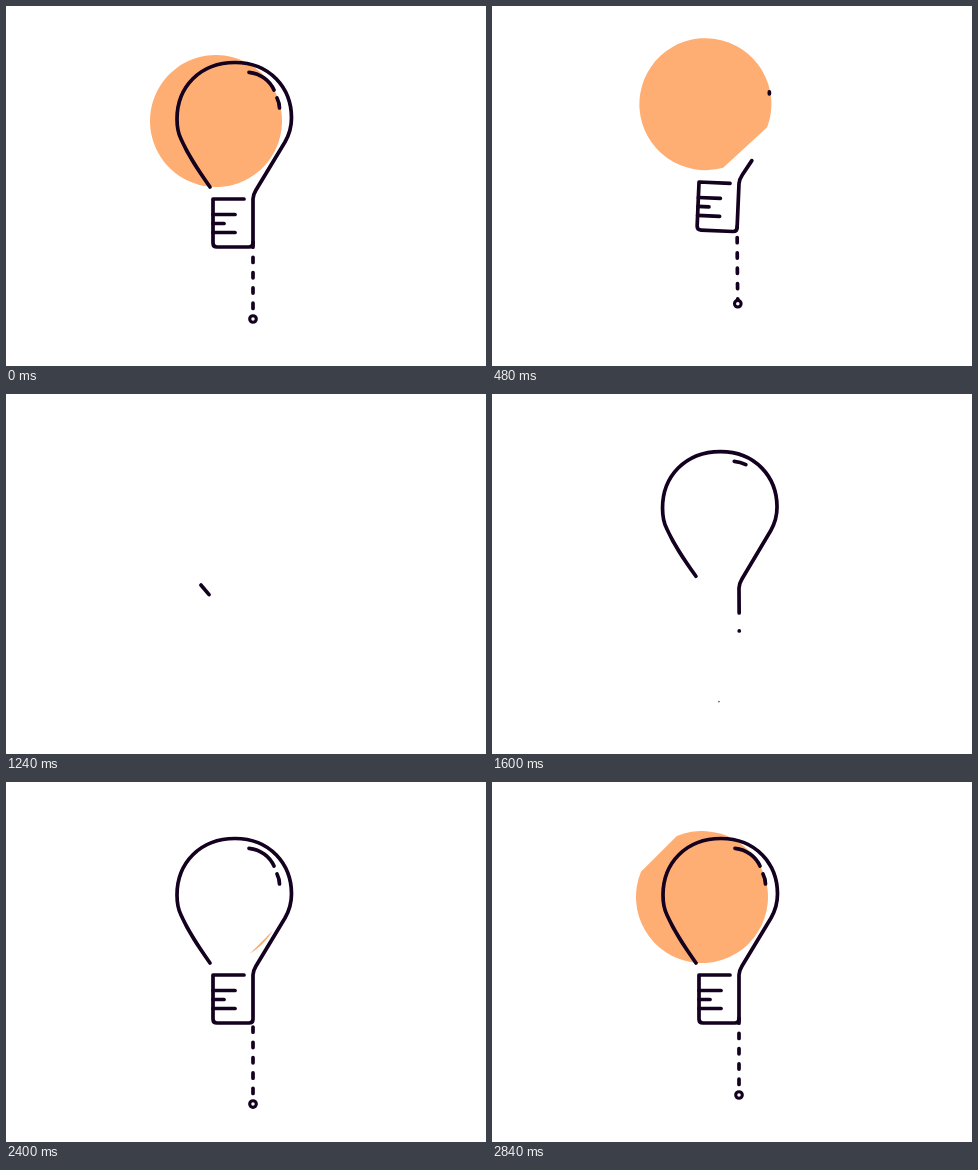
An HTML page that plays this animation: 480 by 360 pixels, repeating every 2880 ms.

```html
<!DOCTYPE html>
<html lang="en">
<head>
<meta charset="utf-8">
<title>Light bulb</title>
<style>
  html, body { margin: 0; width: 100%; height: 100%; overflow: hidden; background: #fff; }
  svg { display: block; width: 100%; height: 100%; }
  path, circle { stroke: #14001f; stroke-width: 3.7; stroke-linecap: round; stroke-linejoin: round; fill: none; }
  #glow { fill: #ffae73; stroke: none; }
  #ring { fill: #fff; stroke-width: 3.1; }
</style>
</head>
<body>
<svg viewBox="0 0 480 360">
  <g id="bulb">
    <path id="glow"/>
    <path id="outline" pathLength="1" d="M204 181 C192 164 183 151 175 133 C171 125 171 118 171 113 C171 81 194 56.5 229 56.5 C264 56.5 285.5 82 285.5 112 C285.5 121 283 129 279 136 L250 184 Q247 189 247 193 V237 Q247 241 243 241 H211 Q207 241 207 237 V193 H238"/>
    <path id="shine" pathLength="1" d="M243 66.3 C255 67.5 264 75 268 84"/>
    <path id="glint" pathLength="1" d="M271 92 Q273.5 97 273.5 102"/>
    <path id="rib1" pathLength="1" d="M207 208.5 H229"/>
    <path id="rib2" pathLength="1" d="M207 217.5 H218"/>
    <path id="rib3" pathLength="1" d="M207 226.5 H229"/>
  </g>
  <path id="cord"/>
  <circle id="ring" r="3.3"/>
</svg>
<script>
const LOOP = 2880, BLANK = 1040;
const $ = id => document.getElementById(id);

const cubic = x => x < .5 ? 4 * x ** 3 : 1 - 4 * (1 - x) ** 3;
const quad = x => x < .5 ? 2 * x * x : 1 - 2 * (1 - x) ** 2;
const sine = x => (1 - Math.cos(Math.PI * x)) / 2;
const quartOut = x => 1 - (1 - x) ** 4;
const backIn = x => x * x * (4.2 * x - 3.2);
const backOut = x => 1 + 2.2 * (x - 1) ** 3 + 1.2 * (x - 1) ** 2;

const span = (t, from, to, ease = cubic) =>
  ease(Math.min(1, Math.max(0, (t - from) / (to - from))));

// Strokes: [erase from, erase to, draw from, draw to]
const strokes = {
  outline: [0, 880, 1080, 1960],
  shine: [0, 460, 1360, 1890],
  glint: [340, 562, 1700, 1960],
  rib1: [500, 840, 1840, 2168],
  rib2: [480, 780, 1780, 2090],
  rib3: [480, 780, 1780, 2120]
};

function trim(el, a, b) {
  el.style.visibility = b - a > .0001 ? 'visible' : 'hidden';
  el.style.strokeDasharray = `${b - a} 3`;
  el.style.strokeDashoffset = -a;
}

// Circle cut by a diagonal that sweeps from lower right to upper left
function glowPath(p, erasing) {
  const r = 66;
  const half = Math.min(Math.PI - .01, Math.max(.01, Math.acos(1 - 2 * p)));
  const at = a => `${210 + r * Math.cos(a)} ${115 + r * Math.sin(a)}`;
  const ends = [at(Math.PI / 4 - half), at(Math.PI / 4 + half)];
  if (erasing) ends.reverse();
  const large = (half > Math.PI / 2) !== erasing ? 1 : 0;
  return `M${ends[0]} A${r} ${r} 0 ${large} 1 ${ends[1]} Z`;
}

// Hanging dashes along a quadratic curve from the socket to the ring
function cordPath(x0, y0, x1, y1, shift, length, from, to) {
  const at = s => {
    const u = s / length;
    return `${x0 + (x1 - x0) * u * u} ${y0 + (y1 - y0) * u}`;
  };
  let d = '';
  for (let k = -2; k < 6; k++) {
    const mid = 2.6 + 15.3 * k + shift;
    const a = Math.max(mid - 2.6, from * length);
    const b = Math.min(mid + 2.6, to * length);
    if (a < b) d += `M${at(a)} L${at(b)}`;
  }
  return d;
}

function draw(t) {
  const leaving = t < BLANK;

  for (const [id, [e0, e1, d0, d1]] of Object.entries(strokes)) {
    if (leaving) trim($(id), span(t, e0, e1), 1);
    else trim($(id), 0, span(t, d0, d1));
  }

  const glow = leaving ? span(t, 400, 740) : span(t, 2350, 2920, quad);
  $('glow').setAttribute('d', glowPath(glow, leaving));

  const settle = 1 - span(t, 1080, 1960, quartOut);
  const lift = leaving ? -35.4 * span(t, 300, 680) : 35 * settle;
  const turn = leaving ? 18 * span(t, 380, 800, sine) : -12 * settle;
  $('bulb').setAttribute('transform', `translate(0 ${lift}) rotate(${turn} 247 193)`);

  const pull = 25.3 * (span(t, 2240, 2600) - span(t, 2640, 2815));
  const swing = leaving ? 0
    : -21 + 30.5 * span(t, 1560, 2000, sine) - 9.5 * span(t, 2000, 2240, sine);
  const slack = leaving ? -4.4 * span(t, 200, 480) : 0;
  const rad = turn * Math.PI / 180;
  const x0 = 247 - 43 * Math.sin(rad), y0 = 193 + lift + 43 * Math.cos(rad);
  const x1 = 247 - .49 * turn + swing, y1 = 313 + lift + pull - swing * swing / 66;
  const from = leaving ? span(t, 500, 880) : 0;
  const to = leaving ? 1 : span(t, 1600, 1960);
  $('cord').setAttribute('d', cordPath(x0, y0, x1, y1, pull + slack, 77 + pull, from, to));

  const size = leaving ? 1 - span(t, 560, 960, backIn) : span(t, 1590, 1900, backOut);
  $('ring').style.visibility = size > .01 ? 'visible' : 'hidden';
  $('ring').setAttribute('transform', `translate(${x1} ${y1}) scale(${Math.max(0, size)})`);
}

const start = performance.now();
function frame() {
  draw((performance.now() - start) % LOOP);
  requestAnimationFrame(frame);
}
frame();
</script>
</body>
</html>
```
